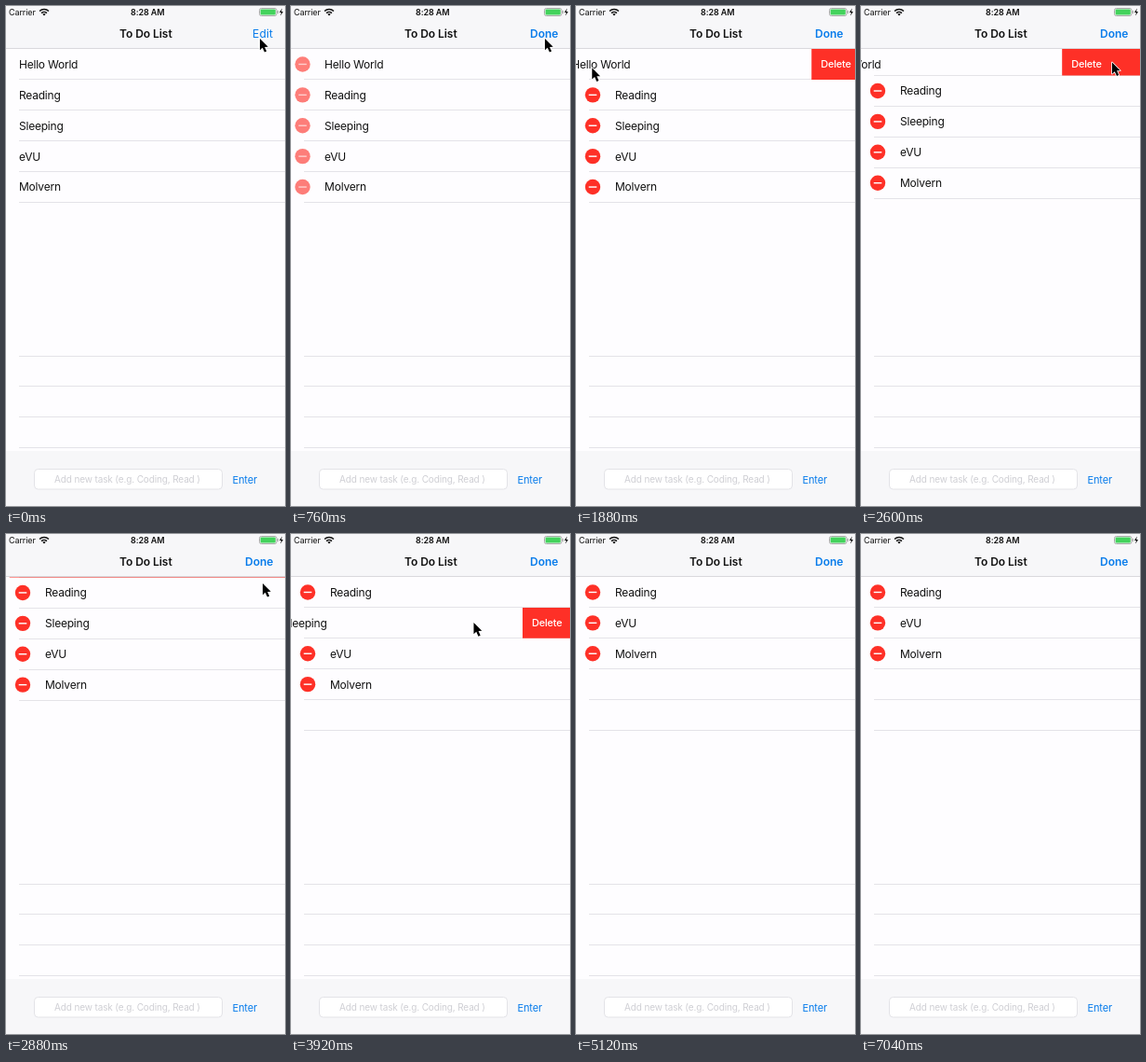
Animation of 300 by 536 pixels, one loop 7760 ms. Source, as an HTML page with a canvas:

```html
<!DOCTYPE html>
<html lang="en">
<head>
<meta charset="utf-8">
<title>To do list</title>
<style>
  html, body { margin: 0; width: 300px; height: 536px; overflow: hidden; background: #fff; }
  canvas { display: block; }
</style>
</head>
<body>
<canvas id="stage" width="300" height="536"></canvas>
<script>
const ctx = document.getElementById('stage').getContext('2d');
const LOOP = 7760, EDIT = 480, STEP = 400;
const TOP = 46, ROW = 32.9, BUTTON = 51, INDENT = 28;
const BLUE = '#087ceb', RED = '#fe3027', LINE = '#e4e3e8', BAR = '#f7f7f9', INK = '#111';

// For each deletion, in ms: the pointer sets off, the button opens, the row folds,
// and the pointer reaches its resting place.
const tasks = [
  { name: 'Hello World', row: 0, leave: 900, open: 1552, fold: 2510, end: 2870, rest: [276, 53] },
  { name: 'Reading' },
  { name: 'Sleeping', row: 1, leave: 2890, open: 3340, fold: 4300, end: 5090, rest: [304, -18] },
  { name: 'eVU' },
  { name: 'Molvern' },
];

const arrow = new Path2D('M0 0V12.2L2.8 9.7L5 14.6L7.2 13.6L5.1 8.9L8.8 8.8Z');
const bolt = new Path2D('M296.8 2.5L294 6.9H295.9L295.2 10.5L298 5.9H296.1Z');

const clamp = u => Math.max(0, Math.min(1, u));
const ease = (t, start, length = STEP) => {
  const u = clamp((t - start) / length);
  return u * u * (3 - 2 * u);
};

function rect(x, y, w, h, color) {
  ctx.fillStyle = color;
  ctx.fillRect(x, y, w, h);
}

function box(x, y, w, h, r, fill, stroke) {
  ctx.beginPath();
  ctx.roundRect(x, y, w, h, r);
  if (fill) { ctx.fillStyle = fill; ctx.fill(); }
  if (stroke) { ctx.strokeStyle = stroke; ctx.lineWidth = 1; ctx.stroke(); }
}

function text(str, x, y, size, weight, color, spacing) {
  ctx.font = `${weight} ${size}px Inter, "Liberation Sans", sans-serif`;
  ctx.letterSpacing = spacing + 'px';
  ctx.fillStyle = color;
  ctx.fillText(str, x, y);
}

const separator = y => rect(14, Math.floor(y + 0.01), 286, 1, LINE);

function drawStatus() {
  text('Carrier', 3, 10, 9, 400, INK, -0.1);
  text('8:28 AM', 134, 10, 9, 600, INK, -0.1);

  ctx.strokeStyle = INK;
  for (let r = 1.2; r < 8; r += 2.9) {
    ctx.lineWidth = r < 2 ? 2.4 : 1.5;
    ctx.beginPath();
    ctx.arc(41, 10.5, r, -Math.PI * 0.75, -Math.PI * 0.25);
    ctx.stroke();
  }

  box(272.5, 2.5, 18.5, 8, 2, null, '#aaa');
  box(273.6, 3.6, 16.2, 5.8, 1, '#43d35c');
  rect(291.7, 5, 1, 3, '#999');
  ctx.fillStyle = INK;
  ctx.fill(bolt);
}

function drawNav(t) {
  rect(0, 0, 300, 45, BAR);
  rect(0, 45, 300, 1, '#dad9dd');
  drawStatus();
  text('To Do List', 122, 34, 12, 600, INK, -0.05);
  if (t < EDIT) text('Edit', 265, 34, 12, 400, BLUE, 0.2);
  else text('Done', 257, 34, 12, 600, BLUE, 0);
}

function drawFooter() {
  rect(0, 477, 300, 59, BAR);
  box(30.5, 496.5, 202, 21.5, 4, '#fff', '#e3e3e7');
  text('Add new task (e.g. Coding, Read )', 52, 511, 10, 400, '#cfcfd4', -0.13);
  text('Enter', 243.5, 511.5, 11, 400, BLUE, -0.15);
}

function drawRow(name, y, height, edit, slide) {
  const mid = y + ROW / 2;
  separator(y + height);
  ctx.save();
  ctx.beginPath();
  ctx.rect(0, y, 300, height);
  ctx.clip();
  if (edit) {
    const x = -8 + 26 * edit - slide;
    ctx.globalAlpha = edit * edit;
    ctx.fillStyle = RED;
    ctx.beginPath();
    ctx.arc(x, mid, 8.2, 0, Math.PI * 2);
    ctx.fill();
    rect(x - 4.3, mid - 0.7, 8.6, 1.4, '#fff');
    ctx.globalAlpha = 1;
  }
  text(name, 14 + INDENT * edit - slide, mid + 4.4, 12, 400, INK, -0.22);
  ctx.restore();

  if (!slide) return;
  ctx.save();
  ctx.beginPath();
  ctx.rect(300 - slide, y, slide, height);
  ctx.fillStyle = RED;
  ctx.fill();
  ctx.clip();
  text('Delete', 310 - slide, mid + 4, 11, 500, '#fff', -0.2);
  ctx.restore();
}

function drawList(t) {
  const edit = ease(t, EDIT);
  let y = TOP, count = 0, folding = false;
  for (const { name, open, fold } of tasks) {
    const folded = fold ? ease(t, fold) : 0;
    if (folded === 1) continue;
    folding ||= folded > 0;
    const slide = open ? BUTTON * ease(t, open) + (300 - BUTTON) * folded : 0;
    const height = ROW * (1 - folded);
    drawRow(name, y, height, edit, slide);
    y += height;
    count++;
  }
  for (let k = 1; k <= 13; k++) {
    if (k > 9 || (k > count && k < 6 && !folding)) separator(TOP + ROW * k);
  }
}

function drawPointer(t) {
  let x = 273, y = 35;
  const move = (toX, toY, start, length) => {
    const u = ease(t, start, length);
    x += (toX - x) * u;
    y += (toY - y) * u;
  };
  for (const { row, leave, open, fold, end, rest } of tasks) {
    if (!open) continue;
    const mid = TOP + ROW * (row + 0.5);
    move(14, mid + 4, leave, open - leave);
    move(270, mid - 2, open + 300, 435);
    move(...rest, fold + 100, end - fold - 100);
  }
  ctx.save();
  ctx.translate(x, y);
  ctx.strokeStyle = '#fff';
  ctx.lineWidth = 1.6;
  ctx.lineJoin = 'round';
  ctx.stroke(arrow);
  ctx.fillStyle = '#000';
  ctx.fill(arrow);
  ctx.restore();
}

function frame(now) {
  const t = now % LOOP;
  rect(0, 0, 300, 536, '#fefdff');
  drawList(t);
  drawNav(t);
  drawFooter();
  drawPointer(t);
  requestAnimationFrame(frame);
}
requestAnimationFrame(frame);
</script>
</body>
</html>
```
